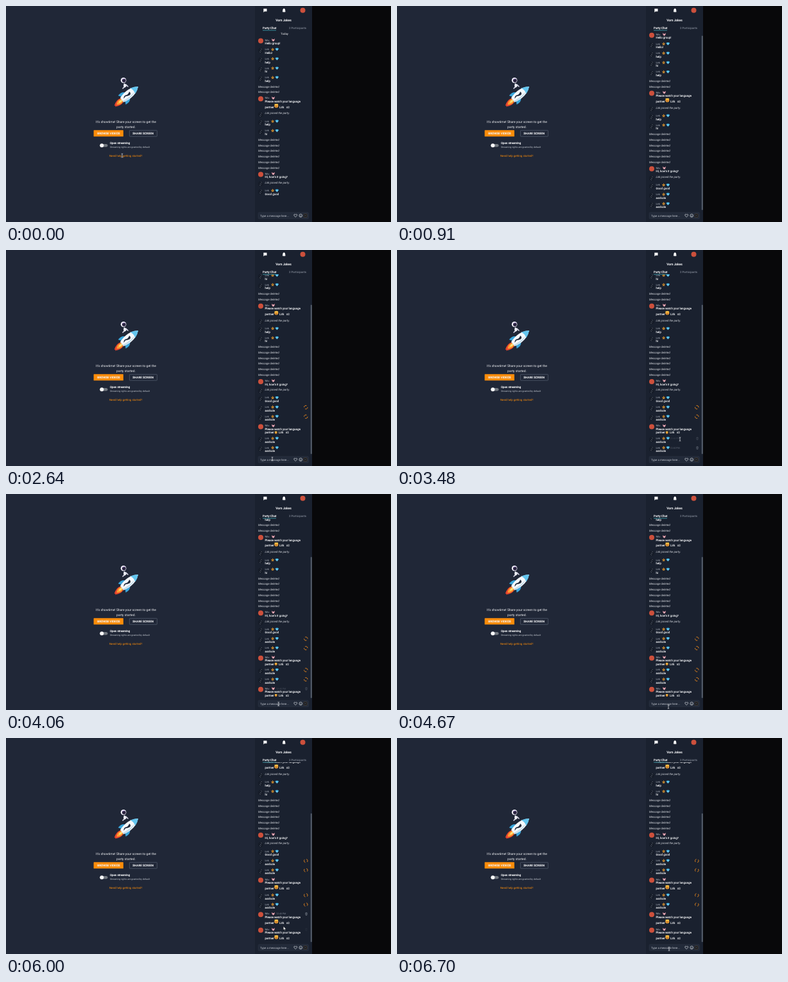
An HTML page that plays this animation: 600x338 px, repeating every 6730 ms.

```html
<!DOCTYPE html>
<html lang="en">
<head>
<meta charset="utf-8">
<title>Party chat</title>
<style>
html, body { margin: 0; width: 100%; height: 100%; overflow: hidden; background: #08080a; }
svg { display: block; width: 100vw; height: 100vh; }
text { font-family: Roboto, "Liberation Sans", sans-serif; font-size: 4.45px; fill: #f4f5f7; text-rendering: geometricPrecision; white-space: pre; }
.mid { text-anchor: middle; }
.bold, .msg { stroke: #f4f5f7; stroke-width: .13; }
.bold { font-weight: 500; }
.it { font-style: italic; fill: #d9dce2; }
.name { font-size: 3.9px; fill: #b4b9c3; }
.time { font-size: 3.6px; fill: #8a919d; }
.line { fill: none; stroke: #d5d8de; stroke-width: .7; }
</style>
</head>
<body>
<svg viewBox="0 0 600 338" preserveAspectRatio="none">
  <defs>
    <clipPath id="view"><rect x="388" y="38" width="89" height="281.5"/></clipPath>
    <g id="host"><circle r="4" fill="#cc503c"/></g>
    <g id="guest">
      <circle r="4" fill="#161c28"/>
      <path d="M.6-3 1.6-1.8M-.6-.6 .6.8M-1.6 1.6-.4 3" stroke="#8d949f" stroke-width=".7" fill="none"/>
    </g>
    <g id="paw">
      <path d="M-2.4-2.4-.8-1 .8-1 2.4-2.4 2 .6 0 2.6-2 .6Z" fill="#d98c9c"/>
      <path d="M-.9-.4H.9L0 1.6Z" fill="#f6e3e6"/>
    </g>
    <g id="star"><path d="M0-2.7.8-.9 2.6-.6 1.2.7 1.5 2.5 0 1.6-1.5 2.5-1.2.7-2.6-.6-.8-.9Z" fill="#e09a34"/><circle r=".8" fill="#7a4a1c"/></g>
    <g id="gem"><path d="M-1.6-2H1.6L2.8-.5 0 2.5-2.8-.5Z" fill="#3fb4e6"/><path d="M-1-.5H1L0 2Z" fill="#a5e4fa"/></g>
    <g id="face">
      <circle r="3" fill="#f0a035"/>
      <path d="M-2.8-1.2-2.4-3.4-1-2.2 0-3.6 1-2.2 2.4-3.4 2.8-1.2Z" fill="#ffce4a"/>
      <path d="M-1.3.2h.8M.5.2h.8M-1 1.6h2" stroke="#6b3b16" stroke-width=".6"/>
    </g>
    <g id="bin"><path d="M-1.5-1.4h3M-1.1-1.2-.9 1.9H.9L1.1-1.2M-.5-2H.5" fill="none" stroke="#aab0ba" stroke-width=".6"/></g>
    <g id="arcs"><path d="M-1.5-2.3A2.75 2.75 0 0 0-1.5 2.3M1.5-2.3A2.75 2.75 0 0 1 1.5 2.3" fill="none" stroke="#ee8a1d" stroke-width=".85"/></g>
  </defs>

  <rect width="600" height="338" fill="#08080a"/>
  <rect width="388" height="338" fill="#202737"/>
  <rect x="388" width="89" height="338" fill="#1a212f"/>

  <!-- rocket -->
  <g transform="translate(189.800 139.600) rotate(50) scale(.92)">
    <path d="M-4 13Q-7 20-1 29Q0 26 1 29Q7 20 4 13Z" fill="#e8452c"/>
    <path d="M-3 13Q-5 19 0 25Q5 19 3 13Z" fill="#ff9d2e"/>
    <path d="M-1.600 13Q-2 17 0 20Q2 17 1.600 13Z" fill="#ffe07a"/>
    <path d="M-6 0Q-12 4-10 13L-5 10ZM6 0Q12 4 10 13L5 10Z" fill="#3ba7dc"/>
    <path d="M0-23Q7.500-13 7-1 6.500 8 4.500 13H-4.500Q-6.500 8-7-1-7.500-13 0-23Z" fill="#f5f8fb"/>
    <path d="M0-23Q5-17 6.300-11 0-14-6.300-11-5-17 0-23Z" fill="#63c5ee"/>
    <path d="M3-13Q8-3 4.500 13H2Q5 0 3-13Z" fill="#c3dceb"/>
    <path d="M-3-6Q2-7 2-2 1 2-1 4L0 9Q-3 7-2.500 3 0 0-3-6Z" fill="#232c3d"/>
  </g>
  <g>
    <path d="M184 121Q188 122 187.500 126L184.500 128Q182 125 184 121Z" fill="#eef0f8"/>
    <path d="M187 123 190 126M184 127 182 129" stroke="#e4e2f2" stroke-width="1.500" stroke-linecap="round"/>
    <circle cx="183.100" cy="116.300" r="4.300" fill="#f2f0fb"/>
    <circle cx="183.800" cy="116.600" r="2.900" fill="#2a2440"/>
    <path d="M181.400 115Q182.700 113.800 184.800 114.300" fill="none" stroke="#9b7ad0" stroke-width=".7"/>
  </g>

  <text class="mid" x="187" y="183.400" style="font-size:5px">It's showtime! Share your screen to get the</text>
  <text class="mid" x="187" y="190.900" style="font-size:5px">party started.</text>
  <rect x="136.600" y="194.300" width="46.300" height="10" rx=".6" fill="#fb8c0a"/>
  <text class="mid bold" x="160" y="200.900" style="font-size:4.600px">BROWSE VIDEOS</text>
  <rect x="192.400" y="194.700" width="43" height="9.400" rx=".6" fill="none" stroke="#566072" stroke-width=".7"/>
  <text class="mid bold" x="213.700" y="200.900" style="font-size:4.600px">SHARE SCREEN</text>
  <rect x="146.500" y="216" width="12" height="4.600" rx="2.300" fill="#727880"/>
  <circle cx="149.300" cy="218.300" r="3" fill="#fafafa"/>
  <text class="bold" x="162" y="216.300" style="font-size:4.400px">Open streaming</text>
  <text x="162" y="221.500" style="font-size:3.600px;fill:#c3c8d0">Streaming rights are granted by default</text>
  <text class="mid" x="186.700" y="236" style="font-size:4.400px;fill:#fb8c0a">Need help getting started?</text>

  <!-- chat header -->
  <path d="M401.300 4.300h5.200v4.200h-3.700l-1.500 1.500z" fill="#fff"/>
  <path d="M433.200 3.700q2 .5 2 2.800v1.700l.7 1h-5.400l.7-1v-1.700q0-2.300 2-2.800zM432.500 9.600h1.400l-.7.700z" fill="#fff"/>
  <use href="#host" x="462.500" y="6.800"/>
  <text class="mid bold" x="432.500" y="24.400" style="font-size:4.850px">Vorn Jokes</text>
  <text class="bold" x="400" y="35.500" style="font-size:4.550px">Party Chat</text>
  <text x="441" y="35.500" style="font-size:4.400px;fill:#9ba2ae">2 Participants</text>

  <g clip-path="url(#view)">
    <g id="list"></g>
    <rect id="thumb" x="474.800" width="1.900" rx=".9" fill="#59616e"/>
  </g>
  <rect x="400" y="37.600" width="21" height=".9" fill="#3a9aa8"/>

  <!-- message box -->
  <rect x="393" y="323" width="78.500" height="10" rx="1.500" fill="#222a39" stroke="#2e3646" stroke-width=".5"/>
  <text x="396" y="329.500" style="font-size:4.400px;fill:#c6cad2">Type a message here...</text>
  <path class="line" d="M451.200 330.400 448.800 327.900Q448.400 325.700 450.200 325.800L451.200 326.700 452.200 325.800Q454 325.700 453.600 327.900Z"/>
  <circle class="line" cx="459.200" cy="328" r="2.400"/>
  <path class="line" d="M458.100 328.700q1.100 1.200 2.200 0M458.200 327.200h.4M459.800 327.200h.4"/>
  <rect x="464.200" y="325.500" width="4.800" height="5" rx="1" fill="#10151e" stroke="#6b5236" stroke-width=".5"/>
  <path d="M465.700 328h1.800" stroke="#a9a29a" stroke-width=".6"/>

  <g id="cursor">
    <path id="beam" d="M-1.300-3Q0-3 0-2.200V2.200Q0 3-1.300 3M1.300-3Q0-3 0-2.200M0 2.200Q0 3 1.300 3" fill="none" stroke="#e8eaee" stroke-width=".7"/>
    <path id="arrow" d="M-1-2.500V3L.3 1.900 1.200 3.800 2.100 3.400 1.200 1.600H3Z" fill="#fff" stroke="#111" stroke-width=".4"/>
  </g>
</svg>
<script>
const LOOP = 6730, TOP = 53.2, END = 323.9, VIEW = 281.5;
const HOST = "Nilu", GUEST = "Lirk";
const $ = id => document.getElementById(id);

// at: arrival, flagged: start of the turning arcs, grow: switch to the large emoji
const guest = (text, at = 0, flagged = Infinity) => ({ kind: "guest", text, at, flagged });
const host = text => ({ kind: "host", text, at: 0 });
const warn = (at, grow) => ({ kind: "warn", at, grow });
const joined = () => ({ kind: "joined", at: 0 });
const deleted = n => Array.from({ length: n }, () => ({ kind: "deleted", at: 0 }));

const rows = [
  host("Hello group!"),
  ...["Hello!", "help", "hi", "help"].map(s => guest(s)),
  ...deleted(2), warn(0, 0), joined(), guest("help"), guest("hi"),
  ...deleted(6), host("Hi, how's it going?"), joined(), guest("Good good"),
  guest("asshole", 350, 1000), guest("asshole", 760, 1000), warn(1050, 4800),
  guest("asshole", 1400, 3700), guest("asshole", 1800, 3700),
  warn(3700, 4800), warn(5150, 5150)
];

// time, x, y of the pointer
const path = [
  [2300, 415, 327], [2700, 415, 327], [3050, 420, 326], [3250, 438, 316],
  [3350, 440, 309], [3480, 441, 296], [3600, 441, 296], [4000, 425, 328],
  [4500, 423, 333], [4900, 423, 333], [5150, 436, 300], [5320, 438, 284],
  [5450, 438, 271], [5650, 438, 271], [6250, 430, 316], [6500, 424, 330], [LOOP, 424, 330]
];

const use = (id, x, y) => `<use href="#${id}" x="${x}" y="${y}"/>`;
const label = (s, x, y, cls) => `<text class="${cls}" x="${x}" y="${y}">${s}</text>`;

function warnLine(cls, y, gap, face) {
  return `<g class="${cls}">${label("partner", 403.5, y, "msg")}${face}` +
    label(GUEST, 425 + gap, y, "msg") + label("x2", 436 + gap, y, "msg") + "</g>";
}

function rowMarkup({ kind, text }) {
  if (kind === "deleted") return label("Message deleted", 393, 1.6, "it");
  if (kind === "joined") return use("guest", 397, 2) + label(GUEST + " joined the party.", 403.5, 1.5, "it");
  const mine = kind === "guest";
  let out = mine
    ? use("guest", 397, 2) + use("star", 415.6, 0) + use("gem", 422.3, 0)
    : use("host", 397, 1.4) + use("paw", 416.5, 0);
  out += label(mine ? GUEST : HOST, 403.5, 1.4, "name");
  out += label(kind === "warn" ? "Please watch your language" : text, 403.5, 7, "msg");
  if (kind === "warn") {
    out += warnLine("big", 15.8, 1, use("face", 421.3, 12.3));
    out += warnLine("small", 12.3, 0, `<g transform="translate(420.700 10.800) scale(.65)">${use("face", 0, 0)}</g>`);
  }
  out += `<g class="hover">${label("12:40 PM", mine ? 425.5 : 421, 1.3, "time")}<g class="bin">${use("bin", 468, .4)}</g></g>`;
  return out + `<g class="arcs">${use("arcs", 0, 0)}</g>`;
}

$("list").innerHTML = `<g>${label("Today", 434, 44.7, "mid")}</g>` +
  rows.map(r => `<g>${rowMarkup(r)}</g>`).join("");
rows.forEach((r, i) => {
  r.el = $("list").children[i + 1];
  for (const part of ["big", "small", "hover", "bin", "arcs"]) r[part] = r.el.querySelector("." + part);
});

function rowHeight(r, t) {
  if (r.kind === "deleted") return 8.75;
  if (r.kind === "joined") return 11.9;
  if (r.kind === "warn") return t >= r.grow ? 24.5 : 19.6;
  return 14.65;
}

function layout(t) {
  let y = TOP;
  const tops = rows.map(r => {
    const top = y;
    if (t >= r.at) y += rowHeight(r, t);
    return top;
  });
  const over = Math.max(0, y - END);
  const scroll = t >= 4780 && t < 5510 ? 77.2 : over;
  return { tops, over, scroll };
}

function pointer(t) {
  if (t < 30) return [181, 234];
  const i = path.findIndex(p => p[0] > t);
  if (i < 1) return null;
  const [t0, x0, y0] = path[i - 1], [t1, x1, y1] = path[i];
  const k = (t - t0) / (t1 - t0);
  return [x0 + (x1 - x0) * k, y0 + (y1 - y0) * k];
}

function hoveredRow(t) {
  const p = pointer(t);
  if (!p || p[0] < 388 || p[1] > 319) return -1;
  const { tops, scroll } = layout(t);
  return rows.findIndex((r, i) => {
    const y = p[1] + scroll - tops[i] + 4;
    return t >= r.at && y >= 0 && y < rowHeight(r, t);
  });
}

const show = (el, on) => el.setAttribute("visibility", on ? "visible" : "hidden");

function render(t) {
  const { tops, over, scroll } = layout(t);
  $("list").setAttribute("transform", `translate(0 ${-scroll})`);

  // hover labels fade in and out over 300 ms
  const fade = rows.map(() => 0), steps = 20;
  for (let k = 0; k < steps; k++) {
    const i = hoveredRow(t - k * 300 / steps);
    if (i >= 0) fade[i] += 1 / steps;
  }

  const turn = (t - 5450) * .3;
  rows.forEach((r, i) => {
    const y = tops[i] - (r.kind === "deleted" || r.kind === "joined" ? .5 : 0);
    r.el.setAttribute("transform", `translate(0 ${y})`);
    r.el.style.display = t >= r.at ? "" : "none";
    if (!r.hover) return;
    const flagged = t >= r.flagged;
    r.hover.setAttribute("opacity", fade[i]);
    r.bin.style.display = flagged ? "none" : "";
    show(r.arcs, flagged);
    r.arcs.setAttribute("transform", `translate(467.300 .4) rotate(${turn})`);
    if (r.big) {
      show(r.big, t >= r.grow);
      show(r.small, t < r.grow);
    }
  });

  const whole = VIEW + over;
  show($("thumb"), over > 0);
  $("thumb").setAttribute("y", 38 + scroll * VIEW / whole);
  $("thumb").setAttribute("height", VIEW * VIEW / whole);

  const p = pointer(t), arrow = t > 5430 && t < 6200;
  show($("beam"), p && !arrow);
  show($("arrow"), p && arrow);
  if (p) $("cursor").setAttribute("transform", `translate(${p[0]} ${p[1]})`);
}

const start = performance.now();
function tick() {
  render((performance.now() - start) % LOOP);
  requestAnimationFrame(tick);
}
tick();
</script>
</body>
</html>
```
